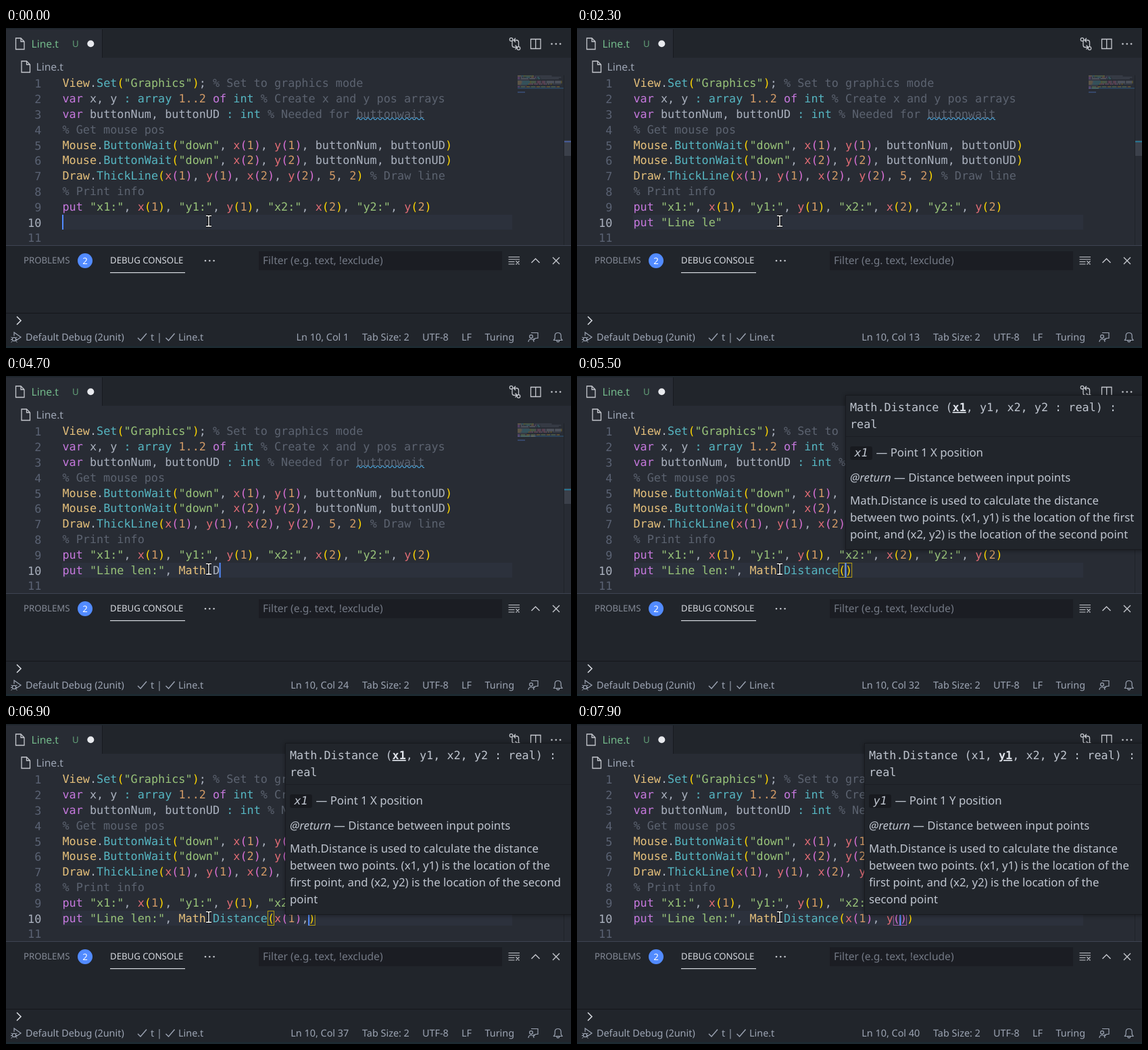
Recreate the animation shown at these times as an HTML page. Size 836 by 473 pixels, loop 8 s.

```html
<!DOCTYPE html>
<html lang="en">
<head>
<meta charset="utf-8">
<title>Editor typing</title>
<style>
html, body { margin: 0; width: 100%; height: 100%; overflow: hidden; background: #282c34; }
svg { display: block; text-rendering: geometricPrecision; }
.mono { font: 16.8px "DejaVu Sans Mono", monospace; }
.ui { font: 15.6px "Noto Sans", sans-serif; }
.doc { font: 16.8px "Noto Sans", sans-serif; }
.bar { font: 14.4px "Noto Sans", sans-serif; }
.tab { font: 13.2px "Noto Sans", sans-serif; }
.box { filter: drop-shadow(0 1px 3px rgba(0,0,0,.4)); }
</style>
</head>
<body>
<svg id="stage" width="836" height="473" viewBox="0 0 836 473">
  <g id="back"></g><g id="live"></g><g id="chrome"></g><g id="popups"></g><g id="mouse"></g>
</svg>
<script>
const CW = 10.114, X0 = 83.5, LH = 22.8, TOP = 70.4, LOOP = 8000;
const FG = '#abb2bf', DARK = '#21252b', EDGE = '#181a1f', DIM = '#9da5b4';
const PAIRS = ['#ffd700', '#da70d6', '#179fff'];

const CODE = [
  'View.Set("Graphics"); % Set to graphics mode',
  'var x, y : array 1..2 of int % Create x and y pos arrays',
  'var buttonNum, buttonUD : int % Needed for buttonwait',
  '% Get mouse pos',
  'Mouse.ButtonWait("down", x(1), y(1), buttonNum, buttonUD)',
  'Mouse.ButtonWait("down", x(2), y(2), buttonNum, buttonUD)',
  'Draw.ThickLine(x(1), y(1), x(2), y(2), 5, 2) % Draw line',
  '% Print info',
  'put "x1:", x(1), "y1:", y(1), "x2:", x(2), "y2:", y(2)'
];

// Suggestions: icon letter, then the label with matched letters between stars
const LISTS = {
  ma: ['n*Ma*th', 'f*ma*x', 'c*ma*xcol', 'c*ma*xcolour', 'c*ma*xint', 'c*ma*xnat', 'c*ma*xrow',
       'c*ma*xx', 'c*ma*xy', 'c*m*inn*a*t', 'cORD HAS *MARK*'],
  d: ['f*D*istance', 'f*D*istancePointLine'],
  x: ['c*x*', 'cma*x*x', 'c*x*or'],
  y: ['c*y*', 'cmax*y*']
};

// Time, text before the caret, text after it, extras
const LEN = 'put "Line len:", ', DIST = LEN + 'Math.Distance(';
const STEPS = [
  [0, ''], [300, 'p'], [400, 'put'], [500, 'put '],
  [800, 'put "', '"'], [1100, 'put "L', '"'],
  [1400, 'put "Li', '"'], [1500, 'put "Lin', '"'], [1600, 'put "Line ', '"'],
  [1800, 'put "Line l', '"'], [1900, 'put "Line le', '"'],
  [2300, 'put "Line le', '"', { off: 1 }],
  [2400, 'put "Line len', '"'], [2700, 'put "Line len:', '"'],
  [3000, 'put "Line len:"'], [3100, 'put "Line len:",'], [3300, LEN],
  [3600, LEN + 'M'], [3700, LEN + 'Ma'], [3800, LEN + 'Ma', '', { list: 'ma', at: 275 }],
  [4100, LEN + 'Math'], [4300, LEN + 'Math.'],
  [4700, LEN + 'Math.D'], [4800, LEN + 'Math.D', '', { list: 'd', at: 307 }],
  [5000, LEN + 'Math.Distance'], [5300, DIST, ')'],
  [5500, DIST, ')', { sig: 397 }],
  [5800, DIST + 'x', ')', { sig: 397 }],
  [5900, DIST + 'x', ')', { sig: 397, list: 'x', at: 307 }],
  [6100, DIST + 'x(', '))', { sig: 397 }],
  [6200, DIST + 'x(', '))', { sig: 401, top: 50.4 }],
  [6300, DIST + 'x(1', '))', { sig: 405 }],
  [6500, DIST + 'x(1)', ')', { sig: 409 }],
  [6800, DIST + 'x(1),', ')', { sig: 409 }],
  [6900, DIST + 'x(1),', ')', { sig: 413 }],
  [7000, DIST + 'x(1),', ')', { sig: 413, arg: 'y' }],
  [7100, DIST + 'x(1), ', ')', { sig: 417, arg: 'y' }],
  [7300, DIST + 'x(1), y', ')', { sig: 421, arg: 'y' }],
  [7400, DIST + 'x(1), y', ')', { sig: 421, arg: 'y', list: 'y', at: 307 }],
  [7700, DIST + 'x(1), y(', '))', { sig: 421, arg: 'y' }],
  [7800, DIST + 'x(1), y(', '))', { sig: 425, arg: 'y' }]
];

const put = (id, html) => { document.getElementById(id).innerHTML = html; };
const rect = (x, y, w, h, fill, more = '') =>
  `<rect x="${x}" y="${y}" width="${w}" height="${h}" fill="${fill}" ${more}/>`;
const text = (x, y, s, cls, fill, more = '') =>
  `<text x="${x}" y="${y}" class="${cls}" fill="${fill}" ${more}>${s}</text>`;
const line = (d, color = DIM, w = 1.2, fill = 'none') =>
  `<path d="${d}" fill="${fill}" stroke="${color}" stroke-width="${w}"/>`;
const ring = (x, y, r, color = DIM) =>
  `<circle cx="${x}" cy="${y}" r="${r}" fill="none" stroke="${color}" stroke-width="1.2"/>`;
const dot = (x, y, r, fill) => `<circle cx="${x}" cy="${y}" r="${r}" fill="${fill}"/>`;
const dots = (x, y) => [0, 6.3, 12.6].map(d => dot(x + d, y, 1.3, '#c5c8ce')).join('');
const colX = c => X0 + c * CW;
const baseY = row => Math.round(87.3 + row * LH);

function colorOf(word, next) {
  if (word[0] === '%') return '#5c6370';
  if (word[0] === '"') return '#98c379';
  if (/^\d/.test(word)) return '#d19a66';
  if (/^(var|put|of)$/.test(word)) return '#c678dd';
  if (/^(View|Mouse|Draw|Math)$/.test(word)) return '#e5c07b';
  if (/^(Set|ButtonWait|ThickLine|Distance|array|int|:)$/.test(word)) return '#56b6c2';
  if (/^[xy]$/.test(word) && next === '(') return '#e06c75';
  return FG;
}

function tokens(s) {
  let depth = 0;
  return [...s.matchAll(/%.*|"[^"]*"|\d+(\.\.\d+)?|\w+|[^\s\w]/g)].map(m => {
    const word = m[0];
    let color;
    if (word === '(') color = PAIRS[depth++ % 3];
    else if (word === ')') color = PAIRS[Math.max(0, --depth) % 3];
    else color = colorOf(word, s[m.index + word.length]);
    return { word, color, col: m.index };
  });
}

const codeLine = (s, row) => tokens(s).map(t =>
  text(colX(t.col).toFixed(2), baseY(row), t.word, 'mono', t.color)).join('');
const mapLine = (s, row) => tokens(s).map(t =>
  rect(757 + t.col * 1.15, 70.3 + row * 2, t.word.length * 1.15, 1.2, t.color, 'opacity=".45"')).join('');

function matchBoxes(s, caret) {
  const at = /[()]/.test(s[caret - 1] || '') ? caret - 1 : caret;
  const open = [];
  for (let i = 0; i < s.length; i++) {
    if (s[i] === '(') open.push(i);
    if (s[i] !== ')' || !open.length) continue;
    const from = open.pop();
    if (at !== from && at !== i) continue;
    return [from, i].map(c => rect(colX(c) + .5, 276.5, CW - 1, 21, 'none',
      `stroke="${PAIRS[open.length % 3]}" stroke-opacity=".65"`)).join('');
  }
  return '';
}

const fileIcon = (x, y) =>
  line(`M${x} ${y}h7.5l5 5v11.5h-12.5zM${x + 7.5} ${y}v5h5`, '#c5c8ce', 1.3);
const check = x => line(`M${x} 458l4 4l9-10.5`, DIM, 1.4);

function icon(kind, y) {
  if (kind === 'n')
    return line(`M286.5 ${y - 6}q-3 0-3 3q0 3-2 3q2 0 2 3q0 3 3 3M290.5 ${y - 6}q3 0 3 3q0 3 2 3q-2 0-2 3q0 3-3 3`, '#c5c8ce', 1.3);
  if (kind === 'f')
    return line(`M288.5 ${y - 7.5}l7 3.8v7.4l-7 3.8l-7-3.8v-7.4zM281.5 ${y - 3.7}l7 3.7l7-3.7M288.5 ${y}v7.5`, '#b180d7', 1.3);
  return line(`M281.5 ${y - 5.5}h15v11h-15zM284.5 ${y - 1.8}h9M284.5 ${y + 1.8}h9`, '#c5c8ce', 1.3);
}

function suggest(items, x) {
  const big = items.length > 10;
  const top = big ? 28.5 : 275 - items.length * LH;
  const rows = items.map((item, i) => {
    const mid = top + 12.4 + i * LH;
    let col = 0;
    const label = item.slice(1).split('*').map((part, k) => {
      const x = 303 + col * CW;
      col += part.length;
      return part && text(x, mid + 6, part, 'mono', k % 2 ? '#dfe3ea' : FG,
        k % 2 ? 'style="font-weight:bold"' : '');
    }).join('');
    return icon(item[0], mid) + label;
  }).join('');
  const detail = big
    ? text(547.6, top + 18.4, 'Mathematical operations', 'mono', '#8b929e') + rect(781, 30, 11, 188, '#434852')
    : '';
  return `<svg x="${x - 275}" width="836" height="277.5">` +
    `<g class="box">${rect(275.5, top, 517, 277 - top, DARK, `stroke="${EDGE}"`)}</g>` +
    rect(276, top + 1, 516, LH, '#2c313a') + rows + detail + '</svg>';
}

function signature(x, y, arg) {
  const tx = x + 7, ink = '#bfc5cf';
  const tail = x < 400
    ? ['between two points. (x1, y1) is the location of the first',
       'point, and (x2, y2) is the location of the second point']
    : ['between two points. (x1, y1) is the location of the',
       ...(x < 420 ? ['first point, and (x2, y2) is the location of the second', 'point']
                   : ['first point, and (x2, y2) is the location of the', 'second point'])];
  const body = ['Math.Distance is used to calculate the distance', ...tail];
  const name = arg + '1';
  const head = 'Math.Distance (x1, y1, x2, y2 : real) :'.replace(name,
    `<tspan font-weight="bold" text-decoration="underline" fill="#dfe3ea">${name}</tspan>`);
  return `<g class="box">${rect(x + .5, y + .5, 845 - x, 153 + body.length * 25, DARK, `stroke="${EDGE}"`)}</g>` +
    text(tx, y + 24, head, 'mono', ink) + text(tx, y + 49, 'real', 'mono', ink) +
    rect(x + 1, y + 61, 840 - x, 1, '#1b1e23') +
    rect(tx, y + 76, 33, 20, EDGE, 'rx="3"') +
    text(tx + 6.5, y + 91, name, 'mono', ink, 'style="font-style:italic"') +
    text(x + 45.5, y + 91, `— Point 1 ${arg.toUpperCase()} position`, 'doc', ink) +
    text(tx, y + 128, '<tspan font-style="italic">@return</tspan> — Distance between input points', 'doc', ink) +
    body.map((s, i) => text(tx, y + 162 + i * 25, s, 'doc', ink)).join('');
}

function drawBack() {
  let h = rect(0, 0, 836, 473, '#282c34') + rect(0, 0, 836, 44, DARK) +
    rect(0, 2, 142, 42, '#282c34') + rect(142, 2, 1, 42, EDGE) + rect(0, 0, 836, 2, '#1f262d');
  h += fileIcon(14.5, 15) + text(37.5, 28.6, 'Line.t', 'ui', '#73b98a') +
    text(98, 28.3, 'U', 'tab', '#62a077') + dot(125.3, 23.2, 5, '#e8eaee');
  h += fileIcon(23, 49) + text(44.5, 63, 'Line.t', 'ui', DIM);
  h += line('M749 18.5v7q0 3 3 3h4M753.5 25.5l3 3l-3 3M758.5 28v-7q0-3-3-3h-4M754 15l-3 3l3 3', '#c5c8ce', 1.3) +
    ring(747.5, 17, 2.3, '#c5c8ce') + ring(758.5, 30, 2.3, '#c5c8ce');
  h += line('M776.5 16.5h14.5v14h-14.5zM783.7 16.5v14', '#c5c8ce', 1.3) + dots(807.5, 23.5);
  h += rect(83, 276, 666, 22, '#2c313c');
  for (let i = 0; i < 11; i++)
    h += text(52.3, baseY(i) + .5, i + 1, 'mono', i === 9 ? FG : '#5a6273', 'text-anchor="end"');
  h += CODE.map(codeLine).join('') + CODE.map(mapLine).join('');
  h += rect(757, 88, 68, 2, '#2f5a80', 'opacity=".5"') + rect(757, 94.3, 11, 1.2, '#4d78cc', 'opacity=".6"');
  let wave = 'M518.5 135.5';
  for (let x = 0; x < 14; x++) wave += 'l1.8 -2.6l1.8 0l1.8 2.6l1.8 0';
  h += line(wave, '#4aa3d8', 1.1).replace('<path', '<path clip-path="inset(0 0 0 0)"');
  put('back', h.replace(wave, wave));
}

function drawChrome() {
  let h = rect(0, 321, 836, 152, DARK) + rect(0, 321, 836, 1, '#3e4452') +
    rect(0, 421, 836, 1, '#15171b') + rect(0, 470, 836, 3, '#1d2a31');
  h += text(26, 348, 'PROBLEMS', 'tab', '#858b97') + dot(117, 344, 11, '#528bff') +
    text(117, 348.7, '2', 'tab', '#fff', 'text-anchor="middle"') +
    text(154, 348, 'DEBUG CONSOLE', 'tab', '#d7dae0') + rect(154, 361, 111, 1.2, '#d7dae0') + dots(295, 344);
  h += rect(374, 330, 360, 28, '#1b1d23') + text(380, 349.4, 'Filter (e.g. text, !exclude)', 'ui', '#737985');
  h += line('M743.5 338.5h16.5M743.5 342h16.5M743.5 345.5h9M743.5 349h9M754.5 344.5l5 5M759.5 344.5l-5 5', '#c5c8ce') +
    line('M777.5 347l6-6l6 6', '#c5c8ce', 1.4) + line('M809 339l10 10M819 339l-10 10', '#c5c8ce', 1.4) +
    line('M16 426.5l6 6l-6 6', '#d7dae0', 1.6);
  h += line('M12 455v-5l10 7l-8 5.5', DIM, 1.2) + ring(12, 460, 2.7) +
    line('M7.5 457l2 1M7 460.5h2.2M7.5 464.5l2-1.5M16.5 457l-2 1M17 460.5h-2.2M16.5 464.5l-2-1.5', DIM, 1);
  h += check(195) + check(236.5);
  const labels = [[29, 'Default Debug (2unit)'], [214, 't |'], [255, 'Line.t'], [527, 'Tab Size: 2'],
    [616, 'UTF-8'], [674, 'LF'], [708.5, 'Turing']];
  h += labels.map(([x, s]) => text(x, 462, s, 'bar', DIM)).join('');
  h += line('M777 450.5h10v8h-3.5l-2.5 2.5v-2.5M773 464q0-4 4-4t4 4', DIM) + ring(777, 456, 2.4) +
    line('M810.5 461.5h12.5l-1.8-3v-3.5q0-4.5-4.5-4.5t-4.5 4.5v3.5zM815 462q0 2 1.8 2t1.8-2', DIM);
  put('chrome', h);
}

function drawMouse() {
  const beam = 'M296 277.5h2.5q1.5 0 1.5 1.5q0-1.5 1.5-1.5h2.5M296 293h2.5q1.5 0 1.5-1.5q0 1.5 1.5 1.5h2.5M300 279v13';
  put('mouse', line(beam, '#000', 3.6) + line(beam, '#fff', 1.4));
}

function drawStep([time, before, after = '', extra = {}]) {
  const full = before + after, n = before.length;
  let h = codeLine(full, 9) + mapLine(full, 9) + matchBoxes(full, n);
  if (!extra.off) h += rect(colX(n) - .5, 276, 2, 22, '#528bff');
  h += rect(825, 70, 1, 251, '#1f2329') + rect(826, 166, 10, 23, '#3b404a') +
    rect(826, 167, 10, 2, time ? '#28738f' : '#465a94');
  put('live', h);
  let p = text(507.3, 462, `Ln 10, Col ${n + 1}`, 'bar', DIM, 'text-anchor="end"');
  if (extra.sig) p += signature(extra.sig, extra.top || 28, extra.arg || 'x');
  if (extra.list) p += suggest(LISTS[extra.list], extra.at);
  put('popups', p);
}

let shown = -1;
function tick() {
  const t = performance.now() % LOOP;
  let i = STEPS.length - 1;
  while (STEPS[i][0] > t) i--;
  if (i !== shown) drawStep(STEPS[shown = i]);
  requestAnimationFrame(tick);
}

drawBack();
drawChrome();
drawMouse();
tick();
</script>
</body>
</html>
```
